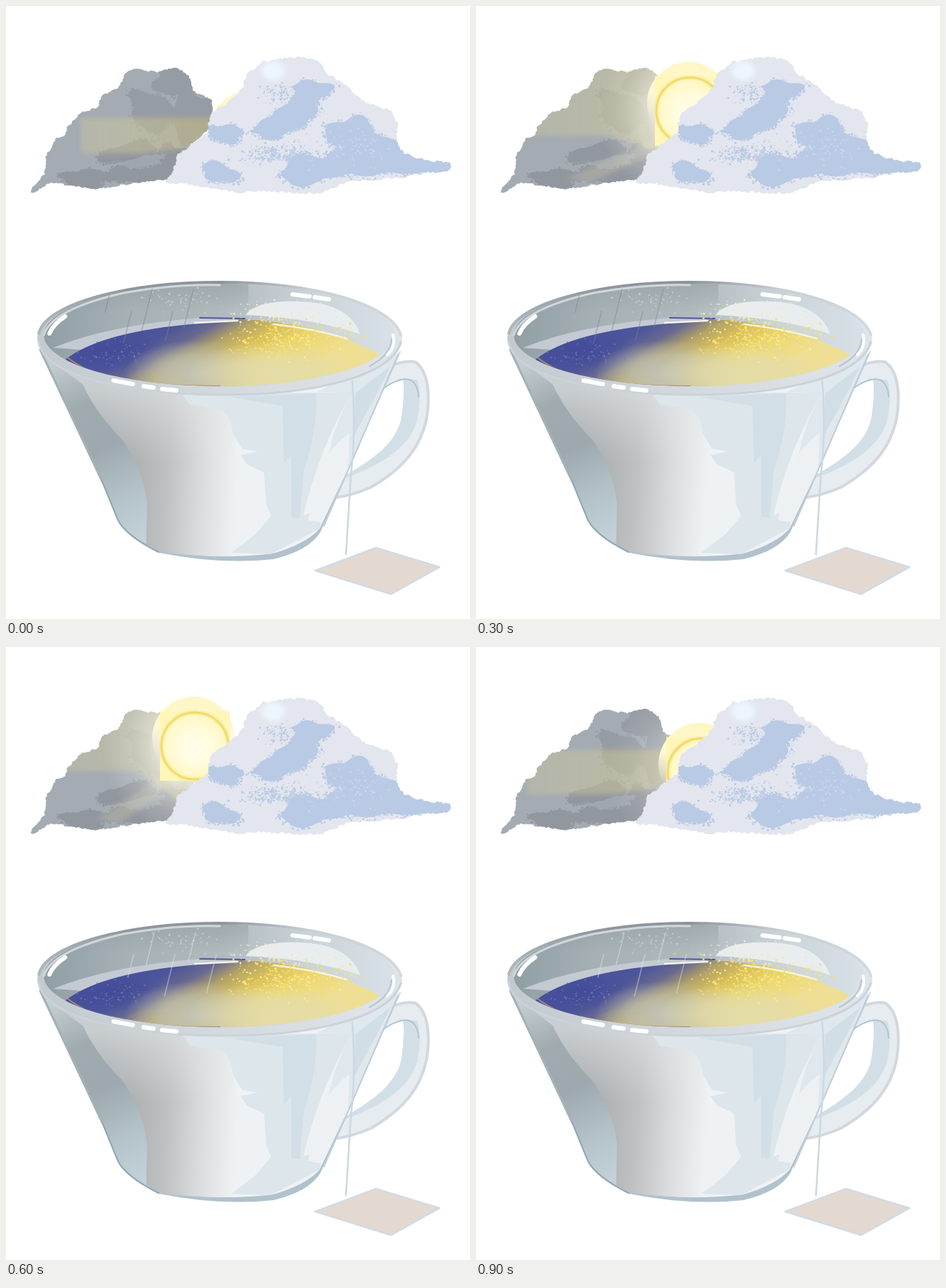
Write an HTML page with a canvas that moves like this. It is 651 by 861 pixels and loops after 1 s.

```html
<!DOCTYPE html>
<html lang="en">
<head>
<meta charset="utf-8">
<title>Tea weather</title>
<style>
html, body { margin: 0; width: 100%; height: 100%; overflow: hidden; background: #fff; }
canvas { display: block; }
</style>
</head>
<body>
<canvas id="stage" width="651" height="861"></canvas>
<script>
const W = 651, H = 861, STEPS = 10, PEAK = 6;
const stage = document.getElementById('stage').getContext('2d');

let seed = 7;
function rnd() {
  seed = (seed + 0x6D2B79F5) | 0;
  let t = Math.imul(seed ^ (seed >>> 15), 1 | seed);
  t = (t + Math.imul(t ^ (t >>> 7), 61 | t)) ^ t;
  return ((t ^ (t >>> 14)) >>> 0) / 4294967296;
}
const spread = () => rnd() + rnd() + rnd() - 1.5;
const clamp = v => Math.max(0, Math.min(1, v));

function layer() {
  const c = document.createElement('canvas');
  c.width = W;
  c.height = H;
  return c.getContext('2d');
}

function fill(g, d, style) {
  g.fillStyle = style;
  g.fill(new Path2D(d));
}

function line(g, d, style, width = 2) {
  g.strokeStyle = style;
  g.lineWidth = width;
  g.lineCap = g.lineJoin = 'round';
  g.stroke(new Path2D(d));
}

// Colours are spaced evenly along a gradient.
function blend(gradient, colors) {
  colors.forEach((c, i) => gradient.addColorStop(i / (colors.length - 1), c));
  return gradient;
}

const ramp = (g, x0, y0, x1, y1, ...colors) =>
  blend(g.createLinearGradient(x0, y0, x1, y1), colors);

function glow(g, x, y, rx, ry, ...colors) {
  g.save();
  g.translate(x, y);
  g.scale(1, ry / rx);
  g.fillStyle = blend(g.createRadialGradient(0, 0, 0, 0, 0, rx), colors);
  g.fillRect(-rx, -rx, rx * 2, rx * 2);
  g.restore();
}

// Outline with small seeded puffs along every edge.
function puffs(g, outline, color, size) {
  const points = outline.split(' ').map(p => p.split(',').map(Number));
  fill(g, 'M' + points.join('L') + 'Z', color);
  points.forEach(([x, y], i) => {
    const [u, v] = points[(i + 1) % points.length];
    const count = Math.ceil(Math.hypot(u - x, v - y) / size);
    for (let k = 0; k < count; k++) {
      g.beginPath();
      g.arc(x + (u - x) * k / count, y + (v - y) * k / count, size * (0.4 + rnd() * 0.7), 0, 7);
      g.fill();
    }
  });
}

// Wobbly brush mark with loose specks around its edge.
function patch(g, x, y, rx, ry, tilt, color) {
  const phase = rnd() * 6;
  const reach = a => 1 + 0.14 * Math.sin(3 * a + phase) + 0.1 * Math.sin(5 * a - phase);
  g.save();
  g.translate(x, y);
  g.rotate(tilt);
  g.fillStyle = color;
  g.beginPath();
  for (let a = 0; a < 6.28; a += 0.1) g.lineTo(rx * reach(a) * Math.cos(a), ry * reach(a) * Math.sin(a));
  g.fill();
  for (let i = 0; i < rx * 4; i++) {
    const a = rnd() * 6.28, r = reach(a) * (1 + spread() * 0.22), s = 1 + rnd() * 2;
    g.fillRect(rx * r * Math.cos(a), ry * r * Math.sin(a), s, s);
  }
  g.restore();
}

function specks(g, count, x, y, rx, ry, color, size) {
  g.fillStyle = color;
  for (let i = 0; i < count; i++) {
    const s = 0.7 + rnd() * size;
    g.fillRect(x + spread() * rx, y + spread() * ry, s, s * (0.6 + rnd() * 0.6));
  }
}

function paintGreyCloud() {
  const g = layer(), dark = '#969ca3', deep = '#92979f';
  puffs(g, '36,261 56,236 59,210 72,188 86,184 87,171 108,151 130,144 137,127 160,117 169,96 182,90 212,95 238,89 255,99 260,121 287,133 290,165 262,190 246,212 238,240 215,242 172,248 125,255 84,249 62,245', '#a4abb3', 3);
  g.globalCompositeOperation = 'source-atop';
  patch(g, 235, 105, 27, 22, 0, dark);
  patch(g, 206, 148, 36, 25, 0.5, dark);
  patch(g, 262, 155, 30, 36, 0, dark);
  patch(g, 172, 206, 42, 13, -0.15, deep);
  patch(g, 110, 242, 32, 13, 0, deep);
  patch(g, 188, 236, 56, 13, 0, deep);
  patch(g, 232, 214, 20, 20, 0, deep);
  patch(g, 192, 218, 26, 7, -0.2, '#a0a6ae');
  return g.canvas;
}

function paintWhiteCloud() {
  const g = layer(), blue = '#b9cae5';
  puffs(g, '227,246 238,231 243,210 284,181 291,151 318,134 334,118 339,99 362,80 410,75 434,77 451,98 476,114 503,139 537,148 546,166 545,190 556,209 590,219 621,222 621,229 585,232 548,239 480,244 440,261 350,257 325,260 250,246', '#e3e6ee', 4);
  g.globalCompositeOperation = 'source-atop';
  patch(g, 430, 118, 27, 14, 0, blue);
  patch(g, 410, 143, 34, 18, -0.5, blue);
  patch(g, 385, 168, 40, 14, -0.25, blue);
  patch(g, 308, 179, 25, 13, 0.1, blue);
  patch(g, 300, 234, 27, 13, 0.3, blue);
  patch(g, 484, 180, 34, 24, 0, blue);
  patch(g, 515, 210, 60, 30, 0.1, blue);
  patch(g, 430, 230, 46, 20, -0.1, blue);
  patch(g, 585, 224, 60, 10, 0, blue);
  specks(g, 300, 380, 208, 50, 14, blue, 2.4);
  specks(g, 120, 385, 122, 26, 16, blue, 2.2);
  specks(g, 150, 480, 200, 70, 28, '#cad6ea', 2);
  glow(g, 375, 91, 22, 18, '#eef6ff', '#eef6ffdd', '#eef6ff00');
  return g.canvas;
}

function paintHandle(g) {
  const edge = 'M538,506 Q560,497 574,500 C592,512 596,545 590,580 C582,618 560,648 512,676 Q485,688 458,691';
  fill(g, edge + ' L480,640 L520,540 Z', '#e6ecef');
  fill(g, 'M550,523 L577,525 Q584,545 577,582 C565,622 525,645 474,664 L484,648 Q540,628 552,580 Z', '#d3dfe6');
  fill(g, 'M519,548 Q535,526 557,524 Q560,545 554,582 C546,612 520,634 476,659 Z', '#fff');
  line(g, edge, '#d3d8df', 4);
  line(g, 'M519,547 Q537,527 560,524 Q577,524 579,549', '#b2c4d1', 2);
}

function paintBody(g) {
  fill(g, 'M46,482 L135,670 L157,722 Q168,744 215,768 Q300,785 375,777 Q425,765 441,739 L480,652 L554,485 Z', '#b1c2cd');
  g.save();
  g.clip(new Path2D('M47,482 L136,670 L158,723 Q178,750 220,767 Q300,778 375,769 Q422,755 440,734 L479,652 L553,485 Z'));
  g.fillStyle = ramp(g, 130, 640, 325, 650, '#9fa5a8', '#aeb1b2', '#bfc1c2', '#dbdcdd', '#eff2f4');
  g.fillRect(0, 400, W, 400);
  g.fillStyle = ramp(g, 0, 535, 0, 640, '#e6eaec99', '#e6eaec00');
  g.fillRect(0, 500, 320, 150);
  fill(g, 'M40,480 L108,532 Q126,572 164,610 Q194,655 198,700 L196,775 L130,740 Z',
    ramp(g, 70, 500, 190, 750, '#c3ced3', '#a0abb0', '#9da9ae', '#b3c1c8', '#c3d1d9'));
  fill(g, 'M248,546 L258,560 L300,566 Q316,574 318,600 L331,622 L353,626 L329,631 L338,644 L362,655 L365,700 L372,716 L350,742 L316,768 L372,770 L440,734 L446,704 L417,716 Q440,620 486,542 Z', '#dde6eb');
  fill(g, 'M312,549 L435,544 Q438,592 418,652 L412,719 L400,718 V630 L390,642 L388,562 Z', '#d3dfe6');
  fill(g, 'M436,542 L553,486 L480,650 L450,712 Q440,620 486,542 Z', '#dfe8ed');
  fill(g, 'M436,650 Q466,610 482,600 L480,652 L446,726 L424,722 Z', '#edf1f3');
  fill(g, 'M490,544 L540,505 L520,545 L488,604 Z', '#d1dee6');
  g.restore();
  line(g, 'M49,485 L135,668', '#a5b1b8', 3);
  line(g, 'M135,668 L157,722 Q168,744 214,767', '#91a6b5', 2);
  line(g, 'M550,490 L480,652 L446,730', '#c0ced8', 2);
}

const bowl = new Path2D();
bowl.ellipse(299, 462, 246, 72, 0, 0, 7);

function paintTea(g) {
  g.save();
  g.clip(bowl);
  g.fillStyle = ramp(g, 55, 0, 545, 0, '#919fa4', '#a7b2b6', '#b0b9bc', '#c9d3d7', '#d8e1e7');
  g.fillRect(0, 380, W, 170);
  g.fillStyle = ramp(g, 0, 390, 0, 430, '#8d989c77', '#8d989c00');
  g.fillRect(50, 380, 290, 60);
  fill(g, 'M336,434 Q352,412 415,415 Q482,418 497,461 Q430,438 336,434 Z', '#e8edf0');
  fill(g, 'M66,480 Q145,448 272,438 L380,441 L350,500 Z', '#c3cad3');

  g.clip(new Path2D('M84,496 Q135,457 270,446 L330,440 Q440,443 527,491 L540,545 L60,545 Z'));
  g.fillStyle = ramp(g, 225, 431, 320, 596, '#4a529c', '#4d559a', '#68698f', '#b3a368', '#d9bf58', '#e8d268', '#edda80', '#efdf95', '#efdf95');
  g.fillRect(60, 430, 480, 120);
  glow(g, 145, 485, 80, 34, '#434c99', '#434c9900');
  glow(g, 270, 517, 105, 48, '#c2c3b9', '#bdbdadcc', '#babaa800');
  glow(g, 375, 515, 120, 44, '#e4dca8', '#e4dca8bb', '#e4dca800');
  line(g, 'M85,493 Q112,514 155,525 Q225,534 300,534', '#a4877c', 2);
  g.restore();

  g.save();
  g.clip(bowl);
  line(g, 'M272,438 L335,439', '#4d5a9d', 2);
  line(g, 'M265,445 L325,442 M376,447 Q430,453 478,467', '#f5f3e8', 2.5);
  specks(g, 70, 245, 412, 60, 18, '#c0c9cd', 2);
  specks(g, 80, 160, 490, 50, 18, '#6f76a8', 1.6);
  specks(g, 150, 390, 430, 65, 16, '#f0ead0', 1.8);
  specks(g, 300, 405, 468, 80, 28, '#f3e06c', 2.4);
  specks(g, 150, 400, 465, 80, 26, '#fbea94', 2.2);
  g.restore();
}

function paintCup() {
  const g = layer();
  paintHandle(g);
  paintBody(g);
  g.fillStyle = ramp(g, 44, 0, 556, 0, '#c3cacf', '#d3d9dd', '#dfe5e9');
  g.beginPath();
  g.ellipse(300, 467, 256, 80, 0, 0, 7);
  g.fill();
  paintTea(g);
  line(g, 'M46,460 C56,418 170,388 300,388 S540,418 554,462', ramp(g, 44, 0, 556, 0, '#adb6bb', '#8f979d', '#8c949a', '#c8cfd5', '#d3d9df'), 4);
  line(g, 'M53,462 Q64,426 165,403 Q240,390 300,392', '#d0d7db', 3);
  line(g, 'M46,472 C54,520 168,545 300,546 S540,520 554,472', '#cbd2d8', 3);
  line(g, 'M151,526 L178,531 M193,534 L207,536 M219,538 L239,540 M61,460 Q66,447 83,436 M402,405 L426,408 M433,409 L453,412', '#fff', 6);
  line(g, 'M541,468 Q540,490 510,506', '#b7c9d5', 2.5);
  line(g, 'M543,462 Q547,478 535,490', '#fff', 4);
  line(g, 'M486,527 Q491,605 484,656 Q481,706 477,770', '#cdd9e2', 2.6);
  const tag = 'M434,793 L519,761 L608,788 L540,826 Z';
  fill(g, tag, '#e3d9d1');
  line(g, tag, '#d3dae3', 2.6);
  return g.canvas;
}

const grey = paintGreyCloud(), white = paintWhiteCloud(), cup = paintCup();
const lit = layer();

// The sun shoots up from behind the white cloud, settles, then sinks faster.
function sunAt(step) {
  const u = step / PEAK, left = 1 - u, k = step - PEAK;
  return k < 0
    ? [345 - 80 * u * (1.25 - 0.25 * u), 139 + 16 * left + 33 * left ** 6]
    : [265 + 8 * k + 3 * k * k, 139 + 12.2 * k];
}

function lightCloud(x, y) {
  const g = lit;
  g.globalCompositeOperation = 'source-over';
  g.clearRect(0, 0, W, H);
  g.drawImage(grey, 0, 0);
  g.globalCompositeOperation = 'source-atop';
  const shine = clamp((188 - y) / 22), high = clamp((158 - y) / 16);
  const top = y - 31 - 55 * high, low = Math.min(207, y + 35), far = 105 - 60 * shine;
  g.filter = 'blur(3px)';
  fill(g, `M${x},${top} H${far} V${low} H190 L${x},${low - 18 + 80 * high} Z`,
    ramp(g, 60, 0, 290, 0, '#d0ca9c55', '#cfc99a77', '#c8b97880'));
  if (high > 0.4) fill(g, `M${x - 30},${y + 30} L128,242 L160,248 L${x - 15},${y + 45} Z`, '#dfd8b040');
  g.filter = 'none';
  const a = n => `rgba(252,252,244,${n * shine})`;
  glow(g, x, y, 130, 130, a(1), a(0.95), a(0.5), a(0.18), a(0));
}

function paintSun(g, x, y) {
  g.fillStyle = ramp(g, 0, y - 69, 0, y + 15, '#fff6c4', '#fff8d2', '#fffbe500');
  g.beginPath();
  g.arc(x - 2, y - 11, 58, 0, 7);
  g.fill();
  glow(g, x, y, 49, 49, '#fffef2', '#fffce0', '#fff6b8');
  g.beginPath();
  g.arc(x, y, 47, 0, 7);
  g.fillStyle = ramp(g, 0, y - 47, 0, y + 47, '#fff8c466', '#fffbe400');
  g.fill();
  g.strokeStyle = '#f7e99a80';
  g.lineWidth = 7;
  g.stroke();
  g.strokeStyle = '#f1dc6a';
  g.lineWidth = 3;
  g.stroke();
}

// Three rain drawings alternate; the order restarts during the rise.
function paintRain(g, step) {
  const kind = (2 * step + (step < 4 ? 0 : 2)) % 3;
  g.save();
  g.clip(bowl);
  for (let i = 0; i < 5; i++) {
    const x = 147 + 29 * i + 16 * kind, y = 398 + (i * 31 + kind * 17) % 62, len = 32 + (i * 13) % 30;
    line(g, `M${x},${y} l${-len * 0.25},${len}`, ['#7a858c70', '#ccd5d930', '#e2e8eb70'][kind], 1.5);
  }
  g.restore();
}

function draw(step) {
  const g = stage, [x, y] = sunAt(step);
  g.fillStyle = '#fff';
  g.fillRect(0, 0, W, H);
  lightCloud(x, y);
  g.drawImage(lit.canvas, 0, 0);
  paintSun(g, x, y);
  g.drawImage(white, 0, 0);
  g.drawImage(cup, 0, 0);
  paintRain(g, step);
}

let shown = -1;
const start = performance.now();
function tick() {
  const step = Math.floor((performance.now() - start) / 100) % STEPS;
  if (step !== shown) draw(shown = step);
  requestAnimationFrame(tick);
}
tick();
</script>
</body>
</html>
```
